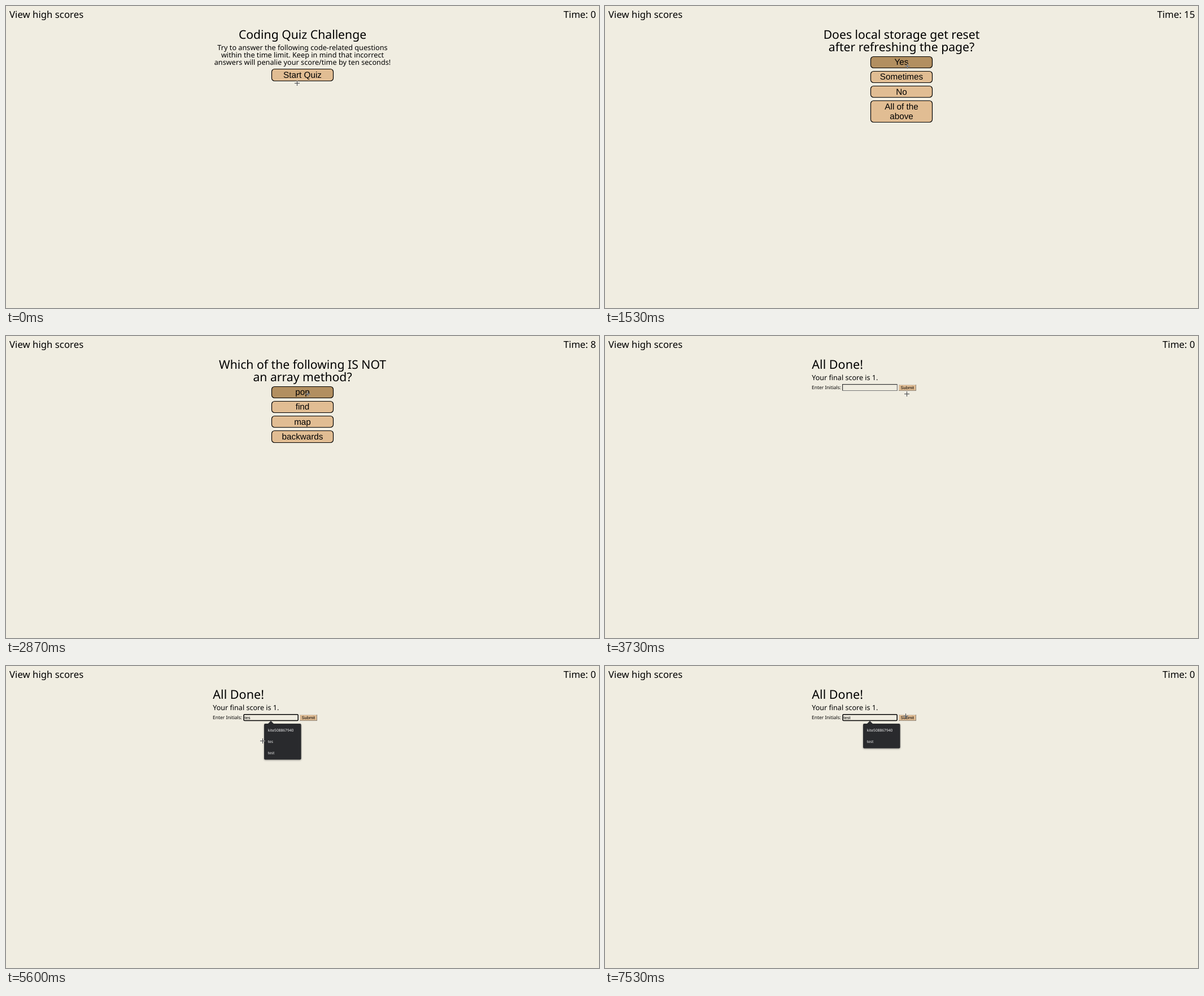
An HTML page with a canvas that plays this animation: 1050 by 534 pixels, repeating every 8000 ms.

```html
<!DOCTYPE html>
<html lang="en">
<head>
<meta charset="utf-8">
<title>Coding Quiz Challenge</title>
<style>
  html, body { margin: 0; width: 100%; height: 100%; overflow: hidden; background: #f0ede1; }
  canvas { display: block; }
</style>
</head>
<body>
<canvas id="stage" width="1050" height="534"></canvas>
<script>
const ctx = document.getElementById('stage').getContext('2d');
const LOOP = 8000;
const CENTER = 525;
const PAPER = '#f0ede1', TAN = '#e1bd93', BROWN = '#b28f60', MENU = '#292a2d';
const HUMANIST = '"Noto Sans", "Open Sans", sans-serif';
const GROTESK = '"Liberation Sans", Arial, sans-serif';

// Each entry holds from its start time until the next one.
const at = (track, t) => track.filter(step => step[0] <= t).pop()[1];

const screens = [
  [0, { title: ['Coding Quiz Challenge'], intro: [
    'Try to answer the following code-related questions',
    'within the time limit. Keep in mind that incorrect',
    'answers will penalie your score/time by ten seconds!'
  ], top: 111.8, buttons: ['Start Quiz'] }],
  [870, { title: ['Does local storage get reset', 'after refreshing the page?'],
    buttons: ['Yes', 'Sometimes', 'No', 'All of the\nabove'] }],
  [1670, { title: ['Which keyword declares', 'a constant value?'],
    buttons: ['const', 'let', 'None of the\nabove', 'All of the\nabove'] }],
  [2670, { title: ['Which of the following IS NOT', 'an array method?'],
    buttons: ['pop', 'find', 'map', 'backwards'] }],
  [3270, { title: ['How do you write a', 'comment in JavaScript?'],
    buttons: ['//', '<!--', '#', 'All of the\nabove'] }],
  [3730, { done: true }]
];

const clock = [[0, 0], [870, 15], [1670, 10], [1870, 9], [2870, 8], [3730, 0]];
const typed = [[0, ''], [4800, 't'], [4930, 'te'], [5000, 'tes'], [5930, 'test']];
const FOCUS = 4530;
const lastKey = [[0, FOCUS], [4800, 4800], [4930, 4930], [5000, 5000], [5930, 5930]];
const menus = [
  [0, []],
  [4800, ['kite508867940', 'tes', 'test', 'two words as initials', 'tt', 'try']],
  [4930, ['kite508867940', 'tes', 'test']],
  [5930, ['kite508867940', 'test']]
];

// time, x, y
const pointerPath = [
  [0, 515, 136], [270, 519, 122], [1000, 519, 122], [1200, 526, 116],
  [1330, 526, 116], [1530, 535, 106], [2070, 535, 106], [2200, 540, 105],
  [2330, 537, 102], [2400, 534, 102], [4000, 534, 102], [4270, 498, 94],
  [4530, 469, 89], [4870, 467, 87], [5000, 466, 101], [5600, 454, 132],
  [5730, 452, 134], [5930, 418, 140], [6130, 418, 140], [6400, 478, 114],
  [6670, 537, 90], [7130, 537, 90], [7270, 532, 88], [LOOP, 532, 88]
];

function pointerAt(t) {
  const next = Math.max(1, pointerPath.findIndex(p => p[0] > t));
  const [t0, x0, y0] = pointerPath[next - 1], [t1, x1, y1] = pointerPath[next];
  const k = (t - t0) / (t1 - t0);
  return { x: Math.round(x0 + (x1 - x0) * k), y: Math.round(y0 + (y1 - y0) * k) };
}

function text(str, x, baseline, size, { family = HUMANIST, align = 'left', color = '#000' } = {}) {
  ctx.font = `${size}px ${family}`;
  ctx.textAlign = align;
  ctx.fillStyle = color;
  ctx.fillText(str, x, baseline);
}

function roundRect(x, y, w, h, r) {
  ctx.beginPath();
  ctx.roundRect(x, y, w, h, r);
}

const snap = v => Math.floor(v) + 0.5;

// Draws a button whose top edge is at y and returns its height.
function button(label, y, pointer) {
  const lines = label.split('\n');
  const x = 470.5, w = 109, h = 20.2 + 17.5 * (lines.length - 1);
  const hover = pointer.x > x && pointer.x < x + w && pointer.y > y && pointer.y < y + h;
  roundRect(x, snap(y), w, snap(y + h) - snap(y), 5);
  ctx.fillStyle = hover ? BROWN : TAN;
  ctx.fill();
  ctx.strokeStyle = '#000';
  ctx.lineWidth = 1.2;
  ctx.stroke();
  lines.forEach((line, i) =>
    text(line, CENTER, Math.round(y + 14.8 + 17.5 * i), 15.25, { family: GROTESK, align: 'center' }));
  return h;
}

function quiz({ title, intro = [], top = 89.3, buttons }, pointer) {
  title.forEach((line, i) => text(line, CENTER, 58 + 22 * i, 21.2, { align: 'center' }));
  intro.forEach((line, i) => text(line, CENTER, 77.5 + 13.2 * i, 12.7, { align: 'center' }));
  let y = top;
  for (const label of buttons) y += button(label, y, pointer) + 6;
}

// A rectangle outline with separate top-left and bottom-right colours.
function bevel(x, y, w, h, topLeft, bottomRight) {
  ctx.fillStyle = bottomRight;
  ctx.fillRect(x, y, w, h);
  ctx.fillStyle = topLeft;
  ctx.fillRect(x, y, w - 1, 1);
  ctx.fillRect(x, y, 1, h - 1);
}

function menu(rows) {
  if (!rows.length) return;
  ctx.font = `6.65px ${HUMANIST}`;
  const widest = Math.max(...rows.map(row => ctx.measureText(row).width));
  ctx.save();
  ctx.shadowColor = 'rgba(0,0,0,.4)';
  ctx.shadowBlur = 3;
  ctx.shadowOffsetY = 1;
  ctx.fillStyle = MENU;
  roundRect(457, 102, Math.max(65.5, widest + 20), 4 + 19.8 * rows.length, 2);
  ctx.fill();
  ctx.restore();
  ctx.fillStyle = MENU;
  ctx.beginPath();
  ctx.moveTo(469, 97);
  ctx.lineTo(474.5, 102.5);
  ctx.lineTo(463.5, 102.5);
  ctx.fill();
  rows.forEach((row, i) => text(row, 463.7, 116.3 + 19.8 * i, 6.65, { color: '#f4f4f4' }));
}

function results(t) {
  text('All Done!', 366.3, 58, 21.6);
  text('Your final score is 1.', 366.3, 77.5, 12.55);
  text('Enter Initials:', 366, 93.6, 8.45);

  const focused = t >= FOCUS;
  if (focused) {
    roundRect(421, 85.8, 96.2, 10.6, 1.5);
    ctx.strokeStyle = '#000';
    ctx.lineWidth = 1.5;
    ctx.stroke();
  } else {
    bevel(420, 85, 98, 12, '#333', '#777');
    ctx.fillStyle = PAPER;
    ctx.fillRect(421.3, 86.3, 95.5, 9.7);
  }

  bevel(520, 86, 31, 11, '#d3c8b8', '#8d857a');
  ctx.fillStyle = TAN;
  ctx.fillRect(521, 87, 29, 9);
  text('Submit', 535.2, 93.8, 7.6, { family: GROTESK, align: 'center' });

  const value = at(typed, t);
  text(value, 422.3, 93.8, 7.6, { family: GROTESK });
  const caretOn = Math.floor((t - at(lastKey, t)) / 533) % 2 === 0;
  if (focused && caretOn) {
    const x = Math.floor(422.5 + ctx.measureText(value).width);
    ctx.fillStyle = '#000';
    ctx.fillRect(x, 87, 0.8, 8);
  }
  menu(at(menus, t));
}

// The crosshair inverts whatever lies below it.
function crosshair({ x, y }) {
  ctx.save();
  ctx.globalCompositeOperation = 'difference';
  ctx.fillStyle = 'rgba(255,255,255,.8)';
  ctx.fillRect(x - 4, y, 9, 1);
  ctx.fillRect(x, y - 4, 1, 4);
  ctx.fillRect(x, y + 1, 1, 4);
  ctx.restore();
}

function draw(now) {
  // The picture advances fifteen steps per second, on times rounded to 10 ms.
  const step = Math.floor(((now % LOOP) + 4) * 0.015) % 120;
  const t = Math.round(step * 20 / 3) * 10;
  const pointer = pointerAt(t);
  const screen = at(screens, t);

  ctx.textRendering = 'geometricPrecision';
  ctx.fillStyle = PAPER;
  ctx.fillRect(0, 0, 1050, 534);
  text('View high scores', 6, 20.8, 16.8);
  text(`Time: ${at(clock, t)}`, 1044.5, 20.8, 16.8, { align: 'right' });
  if (screen.done) results(t);
  else quiz(screen, pointer);
  crosshair(pointer);
}

const start = performance.now();
function tick() {
  draw(performance.now() - start);
  requestAnimationFrame(tick);
}
tick();
</script>
</body>
</html>
```
